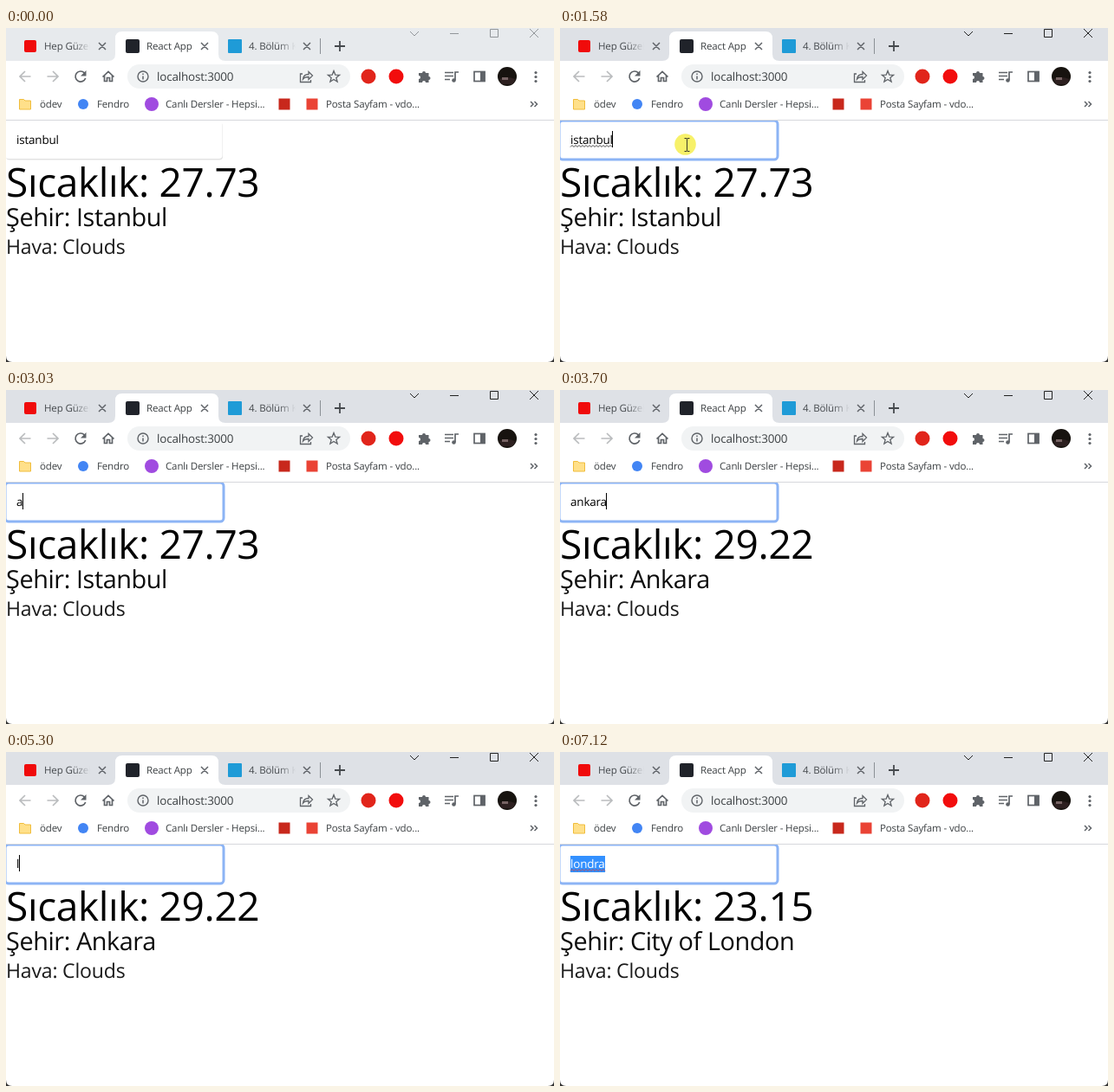
Animation, 632 px wide and 386 px high, one loop 8000 ms. Source, as an HTML page:

```html
<!DOCTYPE html>
<html lang="tr">
<head>
<meta charset="utf-8">
<title>React App</title>
<style>
  html, body { margin: 0; width: 100%; height: 100%; overflow: hidden; background: #fff; }
  svg { display: block; width: 632px; height: 386px; }
  text { font-family: "Open Sans", "Noto Sans", sans-serif; white-space: pre; text-rendering: geometricPrecision; }
  .line { fill: none; stroke: #5f6368; stroke-width: 1.7; }
  .x { fill: none; stroke: #5f6368; stroke-width: 1.5; }
</style>
</head>
<body>
<svg id="stage" viewBox="0 0 632 386">
  <defs>
    <linearGradient id="fadeA" gradientUnits="userSpaceOnUse" x1="78" x2="97" y1="0" y2="0">
      <stop stop-color="#45494d"/><stop offset="1" stop-color="#45494d" stop-opacity="0"/>
    </linearGradient>
    <linearGradient id="fadeB" gradientUnits="userSpaceOnUse" x1="314" x2="334" y1="0" y2="0">
      <stop stop-color="#45494d"/><stop offset="1" stop-color="#45494d" stop-opacity="0"/>
    </linearGradient>
    <clipPath id="page"><rect y="107" width="632" height="279"/></clipPath>
  </defs>

  <!-- tab strip -->
  <rect id="strip" width="632" height="39"/>
  <path d="M118 38Q126 38 126 30V12Q126 4 134 4H237Q245 4 245 12V30Q245 38 253 38Z" fill="#fff"/>
  <rect x="21" y="14" width="14" height="14" rx="2" fill="#f00b0b"/>
  <rect x="138" y="13" width="16" height="16" rx="2" fill="#20232a"/>
  <rect x="256" y="13" width="16" height="16" rx="1" fill="#1f9bd7"/>
  <path class="x" d="M107 17l8 8m0-8l-8 8M225 17l8 8m0-8l-8 8M343 17l8 8m0-8l-8 8"/>
  <path d="M362.5 12V30" stroke="#8b9096"/>
  <path d="M379 21h12M385 15v12" stroke="#45494d" stroke-width="1.8"/>
  <g id="controls" fill="none">
    <path d="M466 4l5 5 5-5M512 6.5h10M558.500 1.500h9v9h-9zM604 1l10 10m0-10l-10 10"/>
  </g>

  <!-- toolbar -->
  <rect y="38" width="632" height="69" fill="#fff"/>
  <path d="M28.500 56H16M22 50l-6 6 6 6M47.500 56H60M54 50l6 6-6 6" class="line" style="stroke:#babcbe"/>
  <path class="line" d="M90.500 52A6 6 0 1 0 91.700 58"/>
  <path d="M92.500 49v6.500h-6.500z" fill="#5f6368"/>
  <path class="line" d="M111.500 56.500l6.500-6 6.500 6M113.500 55v6.500h3v-4h3v4h3V55"/>
  <rect x="140" y="42" width="257" height="28" rx="14" fill="#f1f3f4"/>
  <circle cx="158" cy="56" r="6" class="line" style="stroke-width:1.400"/>
  <path d="M158 52.500v1.500M158 55.500v4" stroke="#5f6368" stroke-width="1.500"/>
  <path class="line" style="stroke-width:1.300" d="M342 53h-2.500v9.500h12V60M342.500 59c.5-4 3-5.500 6.500-5.500V50.500l4.500 4.500-4.500 4.500v-3c-3 0-5 .5-6.500 2.500z"/>
  <path id="star" class="line" style="stroke-width:1.300"/>
  <circle cx="418" cy="56" r="8.500" fill="#e1251b"/>
  <circle cx="450" cy="56" r="8.500" fill="#f20d0d"/>
  <path fill="#5f6368" d="M476 52h4a2 2 0 1 1 4 0h3.500v4a2 2 0 1 1 0 4v3H484a2 2 0 1 0-4 0H476v-4a2 2 0 1 0 0-4z"/>
  <path class="line" d="M506 51.500h10M506 55.500h10M506 59.500h6M518 60V51h4"/>
  <circle cx="516.500" cy="60.500" r="2.300" fill="#5f6368"/>
  <rect x="540" y="50.500" width="12" height="11" class="line"/>
  <rect x="547" y="50" width="5.500" height="12" fill="#5f6368"/>
  <circle cx="578" cy="56" r="11" fill="#17130f"/>
  <path d="M569 59q9-4 18 0a11 11 0 0 1-3 6h-12z" fill="#2d2020"/>
  <path d="M572 57h7v3h-7z" fill="#766363"/>
  <g fill="#5f6368"><circle cx="611" cy="51.500" r="1.600"/><circle cx="611" cy="56.500" r="1.600"/><circle cx="611" cy="61.500" r="1.600"/></g>

  <!-- bookmarks -->
  <path d="M16 82.500h4.500l1.500 1.500h6.500v10H15.500v-11.500z" fill="#ffe08a" stroke="#f0bd3c"/>
  <circle cx="89" cy="88" r="6" fill="#4285f4"/>
  <circle cx="168" cy="88" r="8" fill="#a04be0"/>
  <rect x="314.500" y="81.500" width="13" height="13" fill="#c8281c"/>
  <rect x="346.500" y="81.500" width="13" height="13" fill="#ea4335"/>
  <path d="M605 85l3 3-3 3M609.500 85l3 3-3 3" class="line" style="stroke-width:1.500"/>
  <path d="M0 106.500H632" stroke="#d6d8dc"/>

  <!-- page -->
  <g clip-path="url(#page)">
    <rect x="0" y="109" width="250" height="43.500" rx="4" fill="#e3e3e3"/>
    <rect x="-1" y="104" width="250.500" height="47" rx="4" fill="#fff"/>
    <rect id="ring" x="-1" y="107" width="252" height="45" rx="4" fill="#fff" stroke="#8cb4f5" stroke-width="3"/>
  </g>
  <circle id="halo" r="12.300" fill="#f7f169"/>
  <rect id="mark" x="12" y="120" width="40" height="19" fill="#3390ff"/>
  <g id="labels"></g>
  <path id="wave" fill="none" stroke-width="1"/>
  <rect id="caret" y="119" width="1" height="19" fill="#000"/>
  <path id="beam" d="M-3 -7.500h2.500l.5.500.5-.5H3M0 -7V7M-3 7.500h2.500l.5-.5.500.5H3" fill="none" stroke="#3a3a2a"/>
  <path id="arrow" d="M0 0V16.500L3.800 13 6.300 18.700 8.700 17.600 6.200 12H11.500Z" fill="#fff" stroke="#000"/>
  <path d="M0 379V386H7Q0 386 0 379ZM632 379V386H625Q632 386 632 379Z" fill="#333"/>
</svg>

<script>
const LOOP = 8000;
const $ = id => document.getElementById(id);
const set = (el, attrs) => { for (const k in attrs) el.setAttribute(k, attrs[k]); };
const show = (id, on) => { $(id).style.display = on ? "" : "none"; };

function label(x, y, size, str, fill = "#3c4043", gap = -0.012) {
  const el = document.createElementNS("http://www.w3.org/2000/svg", "text");
  set(el, { x, y, fill, "font-size": size * 0.96, "letter-spacing": size * gap });
  el.textContent = str;
  $("labels").append(el);
  return el;
}

label(44, 25, 12, "Hep Güzel", "url(#fadeA)");
label(162, 25, 12, "React App");
label(280, 25, 12, "4. Bölüm K", "url(#fadeB)");
label(174, 61, 14, "localhost:3000");
label(39, 92, 12, "ödev");
label(105, 92, 12, "Fendro");
label(184, 92, 12, "Canlı Dersler - Hepsi...");
label(369, 92, 12, "Posta Sayfam - vdo...");

const field = label(12, 134, 14, "", "#000");
const temp = label(0, 195, 48, "", "#000", -0.008);
const city = label(0, 229, 30, "", "#0c0c0c", -0.0136);
label(0, 261, 24, "Hava: Clouds", "#1a1a1a", -0.008);

const starPts = Array.from({ length: 10 }, (_, i) => {
  const a = i * Math.PI / 5 - Math.PI / 2, r = i % 2 ? 3 : 7;
  return (378 + r * Math.cos(a)).toFixed(2) + " " + (56.5 + r * Math.sin(a)).toFixed(2);
});
$("star").setAttribute("d", "M" + starPts.join("L") + "Z");

const wavePath = w => {
  let d = "M12 137.500";
  for (let x = 2, up = true; x <= w; x += 2, up = !up) d += "L" + (12 + x) + " " + (up ? 135.5 : 137.5);
  return d;
};

// start, text, caret x (0 = hidden), width of selection
const typing = [
  [0, "istanbul", 0, 0], [1500, "istanbul", 60, 0], [1970, "istanbul", 0, 49],
  [3030, "a", 19, 0], [3130, "an", 27, 0], [3230, "ank", 34, 0],
  [3380, "anka", 41, 0], [3460, "ankar", 46, 0], [3620, "ankara", 53, 0],
  [4180, "ankara", 0, 0], [4640, "ankara", 0, 41],
  [5300, "l", 15, 0], [5560, "lo", 23, 0], [5690, "lon", 31, 0], [5820, "lond", 39, 0],
  [6020, "londr", 45, 0], [6190, "londra", 51, 0], [6730, "londra", 0, 0], [7120, "londra", 0, 40]
];
const weather = [
  [0, "27.73", "Istanbul"], [3700, "29.22", "Ankara"],
  [5820, "24.28", "Lon"], [6270, "23.15", "City of London"]
];
const at = (table, t) => table.filter(row => row[0] <= t).pop();

function pointer(t) {
  if (t >= 1500) return [144.5, 134.5];
  const p = Math.min(1, Math.floor((t - 660) / 70) / 11);
  const e = 1 - (1 - p) ** 2;
  return [438.5 - 283 * e, 275 - 140.5 * e];
}

function draw(t) {
  const active = t >= 1500;
  $("strip").setAttribute("fill", active ? "#dee1e6" : "#e7eaed");
  $("controls").setAttribute("stroke", active ? "#222" : "#92969a");
  $("ring").setAttribute("opacity", active ? (t < 1580 ? 0.5 : 1) : 0);

  const [, str, caretX, sel] = at(typing, t);
  field.textContent = str;
  field.setAttribute("fill", sel ? "#fff" : "#000");
  show("caret", caretX);
  $("caret").setAttribute("x", caretX);
  show("mark", sel);
  $("mark").setAttribute("width", sel);

  const clicked = t >= 1580 && t < 1970;
  show("wave", clicked || sel);
  set($("wave"), { d: wavePath(sel || 49), stroke: sel ? "#b0485c" : "#444" });

  const [, deg, place] = at(weather, t);
  temp.textContent = "Sıcaklık: " + deg;
  city.textContent = "Şehir: " + place;

  const visible = t >= 660 && t < 1900;
  const [x, y] = pointer(t);
  const overText = x < 280 && y < 200;
  show("halo", visible);
  show("beam", visible && overText);
  show("arrow", visible && !overText);
  set($("halo"), { cx: x, cy: y });
  $("beam").setAttribute("transform", `translate(${Math.round(x + 1) + 0.5} ${Math.round(y)})`);
  $("arrow").setAttribute("transform", `translate(${Math.round(x) + 0.5} ${Math.round(y) + 0.5})`);
}

const start = performance.now();
function tick() {
  draw((performance.now() - start) % LOOP);
  requestAnimationFrame(tick);
}
tick();
</script>
</body>
</html>
```
